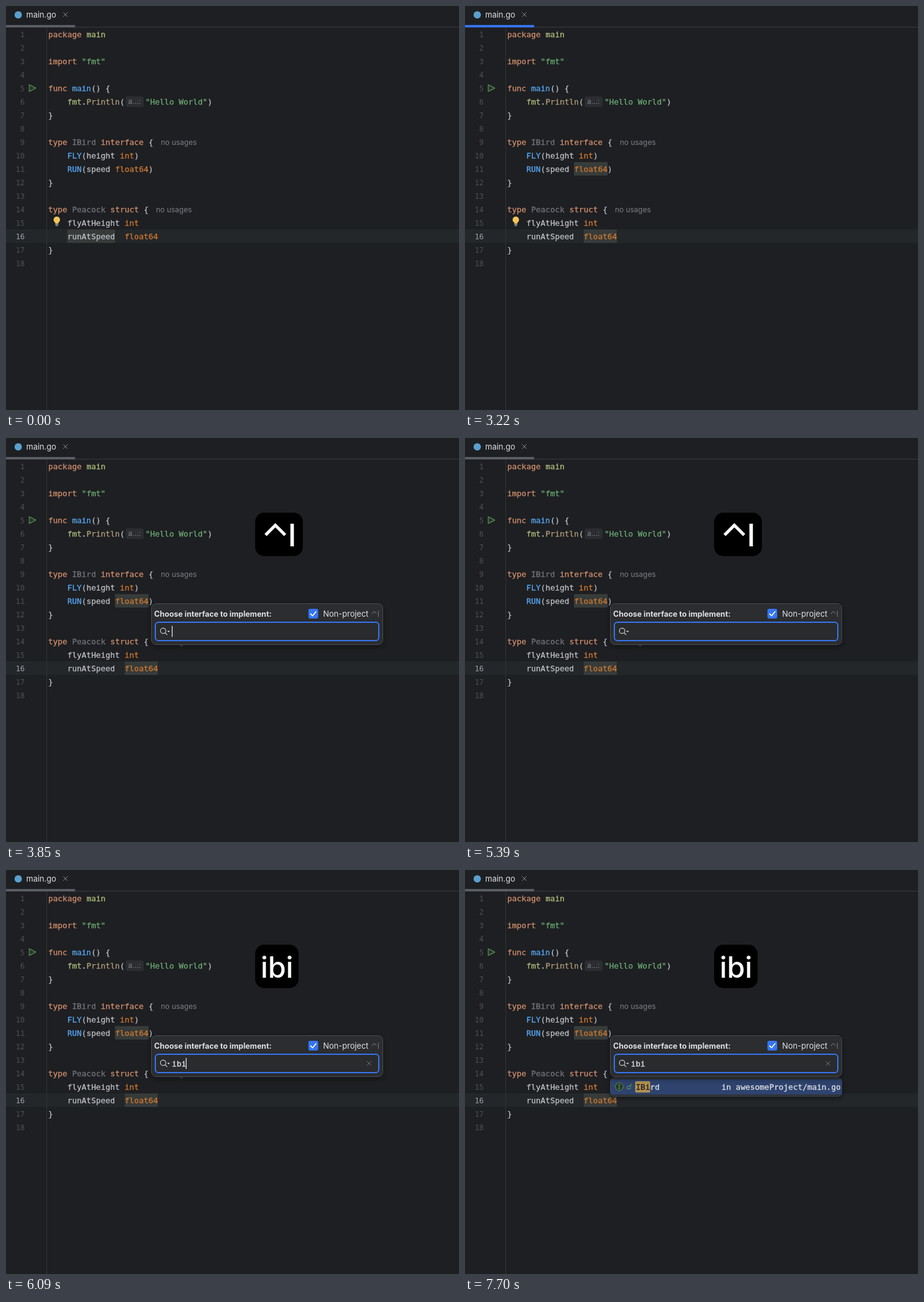
Write an HTML page that moves like this. It is 740x660 px and loops after 8 s.

```html
<!DOCTYPE html>
<html lang="en">
<head>
<meta charset="utf-8">
<title>Implement interface</title>
<style>
  html, body { margin: 0; width: 100%; height: 100%; overflow: hidden; background: #1e1f22; }
  svg { display: block; width: 740px; height: 660px; }
  .mono {
    font: 12.95px "DejaVu Sans Mono", "Noto Sans Mono", monospace;
    color: #bcbec4; fill: currentColor; stroke: currentColor; stroke-width: .3px;
  }
  .num { font-size: 12px; color: #4b5059; stroke-width: 0; text-anchor: end; }
  .ui { font: 13px Inter, "Liberation Sans", sans-serif; fill: #dfe1e5; }
  .title { font-size: 12.5px; font-weight: 700; }
  .hint { font-size: 12px; fill: #7a7e85; }
  .key { color: #cf8e6d; }
  .type { color: #cc7832; }
  .str { color: #6aab73; }
  .func { color: #56a8f5; }
  .call { color: #b09d79; }
  .pkg { color: #afbf7e; }
  .dim { color: #6f737a; }
  .now { color: #a1a3ab; }
  .light { color: #dfe1e5; }
  .dark { color: #1e1f22; }
  .line { fill: none; stroke-linecap: round; stroke-linejoin: round; }
  .edge { fill: #2b2d30; stroke: #111214; stroke-width: 2px; filter: url(#shadow); }
  .rim { fill: #2b2d30; stroke: #4b4d51; }
  .big { font: 500 47.5px Inter, "Liberation Sans", sans-serif; fill: #fff; }
</style>
</head>
<body>
<svg viewBox="0 0 740 660" xmlns="http://www.w3.org/2000/svg">
  <defs>
    <filter id="shadow" x="-10%" y="-30%" width="120%" height="180%">
      <feDropShadow dx="0" dy="3" stdDeviation="5" flood-color="#000" flood-opacity=".4"/>
    </filter>
  </defs>
  <rect width="740" height="660" fill="#1e1f22"/>
  <rect y="365" width="740" height="22" fill="#24272a"/>
  <rect y="34" width="740" height="1" fill="#393b40"/>
  <rect x="66" y="35" width="1" height="625" fill="#313438"/>

  <rect id="tab" y="31" width="113" height="4" rx="1"/>
  <circle cx="20" cy="14.5" r="6" fill="#5a9fd0"/>
  <text class="ui" x="33" y="19">main.go</text>
  <path class="line" d="M93.7 10.7l6.6 6.6m0-6.6l-6.6 6.6" stroke="#868a91"/>

  <path d="M38 128.5v11.2l10.6-5.6z" fill="#253627" stroke="#57965c" stroke-width="1.2" stroke-linejoin="round"/>
  <g fill="#373b39">
    <rect id="fieldMark" x="100" y="365" width="78" height="22"/>
    <g id="typeMark">
      <rect x="178" y="255" width="55" height="22"/>
      <rect x="194" y="365" width="54" height="22"/>
    </g>
  </g>
  <rect x="195.5" y="147.5" width="29.5" height="17.5" rx="4" fill="#2b2d30"/>
  <text class="ui hint" x="199.5" y="160">a...:</text>
  <g id="code"></g>
  <text class="ui hint" x="253" y="227">no usages</text>
  <text class="ui hint" x="245" y="337">no usages</text>

  <g id="bulb">
    <path d="M83 344a5.2 5.2 0 0 1 2.6 9.7v1.8h-5.2v-1.8a5.2 5.2 0 0 1 2.6-9.7z" fill="#f2c55c"/>
    <path d="M80.4 356.7h5.2m-4.6 2h4" stroke="#ced0d6"/>
  </g>
  <rect id="caret" x="247" y="367" width="2" height="18" fill="#ced0d6"/>

  <g id="list">
    <rect class="edge" x="237.5" y="339.5" width="378" height="30" rx="6"/>
    <rect class="rim" x="237.5" y="339.5" width="378" height="30" rx="6"/>
    <rect x="238" y="342" width="377.5" height="25" fill="#2e436e"/>
    <circle cx="252" cy="354" r="6.4" fill="#253627" stroke="#57965c"/>
    <path d="M250 351h4m-2 0v6m-2 0h4" stroke="#57965c"/>
    <path class="line" d="M265.5 353.5h5v4h-5zm3.5 0v-1.5a1.8 1.8 0 0 1 3.6 0v.8" stroke="#57965c"/>
    <rect x="278" y="345" width="24.5" height="18.5" rx="2" fill="#b2924f"/>
    <text class="mono dark" x="279" y="358.5">IBi</text>
    <text class="mono light" x="302.4" y="358.5">rd</text>
    <text class="mono light" x="419" y="358.5">in awesomeProject/main.go</text>
  </g>

  <g id="popup">
    <rect class="edge" x="237.5" y="270.5" width="378" height="67" rx="7"/>
    <rect class="rim" x="237.5" y="270.5" width="378" height="67" rx="7"/>
    <text class="ui title" x="242" y="291.5">Choose interface to implement:</text>
    <rect x="494" y="279" width="16" height="16" rx="3" fill="#3574f0"/>
    <path class="line" d="M497.8 287.3l3 3.2 5.6-6.8" stroke="#fff" stroke-width="1.8"/>
    <text class="ui" x="518" y="291.5">Non-project</text>
    <path class="line" d="M598 287l3.5-4 3.5 4m3.3-4.5v9.5" stroke="#7a7e85"/>
    <rect x="244" y="301" width="365" height="30" rx="5" fill="#2a2b2d" stroke="#3574f0" stroke-width="2"/>
    <circle class="line" cx="256.7" cy="315" r="4.4" stroke="#ced0d6" stroke-width="1.2"/>
    <path class="line" d="M260 318.3l3 3" stroke="#ced0d6" stroke-width="1.2"/>
    <path d="M263.3 315h4.6l-2.3 2.6z" fill="#ced0d6"/>
    <text id="query" class="mono light" x="271" y="320.5"></text>
    <path id="clear" class="line" d="M589.8 312.8l6.4 6.4m0-6.4l-6.4 6.4" stroke="#6f737a"/>
    <rect id="inputCaret" y="307" width="1.3" height="18" fill="#dfe1e5"/>
  </g>

  <g id="badge">
    <rect id="badgeBox" x="407" y="122" height="71" rx="15"/>
    <text id="typed" class="big" x="416" y="175.5"></text>
    <g id="shortcut">
      <path d="M424 158.5l16-16 16 16" fill="none" stroke="#fff" stroke-width="5"/>
      <text class="big" x="460.5" y="176.5" style="font-size:51px">I</text>
    </g>
  </g>
</svg>
<script>
const LOOP = 8000, CHAR = 7.8, LEFT = 69, FIRST = 50.5, ROW = 22;
const el = {};
for (const node of document.querySelectorAll("[id]")) el[node.id] = node;

// row, then column / text / class triples
const code = [
  [1, 0, "package", "key", 8, "main", "pkg"],
  [3, 0, "import", "key", 7, '"fmt"', "str"],
  [5, 0, "func", "key", 5, "main", "func", 9, "()", "", 12, "{", ""],
  [6, 4, "fmt", "pkg", 7, ".", "", 8, "Println", "call", 15, "(", "",
    20.35, '"Hello World"', "str", 33.35, ")", ""],
  [7, 0, "}", ""],
  [9, 0, "type", "key", 5, "IBird", "dim", 11, "interface", "key", 21, "{", ""],
  [10, 4, "FLY", "func", 7, "(height", "", 15, "int", "type", 18, ")", ""],
  [11, 4, "RUN", "func", 7, "(speed", "", 14, "float64", "type", 21, ")", ""],
  [12, 0, "}", ""],
  [14, 0, "type", "key", 5, "Peacock", "dim", 13, "struct", "key", 20, "{", ""],
  [15, 4, "flyAtHeight", "", 16, "int", "type"],
  [16, 4, "runAtSpeed", "", 16, "float64", "type"],
  [17, 0, "}", ""]
];

function addText(x, row, text, cls) {
  const node = document.createElementNS("http://www.w3.org/2000/svg", "text");
  node.setAttribute("x", x);
  node.setAttribute("y", FIRST + (row - 1) * ROW);
  node.setAttribute("class", "mono " + cls);
  node.textContent = text;
  el.code.append(node);
}

for (let n = 1; n <= 18; n++) addText(30.5, n, n, n === 16 ? "num now" : "num");
for (const [row, ...parts] of code) {
  for (let i = 0; i < parts.length; i += 3) {
    addText(LEFT + parts[i] * CHAR, row, parts[i + 1], parts[i + 2]);
  }
}

const show = (name, on) => { el[name].style.display = on ? "" : "none"; };
const within = (t, ...spans) => spans.some(([from, to]) => t >= from && t < to);
// latest value whose start time has passed
const latest = (t, steps) => steps.filter(([at]) => t >= at).pop()[1];

function update(t) {
  const query = latest(t, [[0, ""], [5950, "i"], [6020, "ib"], [6090, "ibi"]]);
  const keys = latest(t, [[0, ""], [5880, "i"], [6020, "ib"], [6090, "ibi"]]);

  el.tab.setAttribute("fill", within(t, [1120, 3850]) ? "#3574f0" : "#5a5d63");
  show("fieldMark", t < 1120);
  show("typeMark", t >= 1120);
  show("bulb", within(t, [0, 1120], [2170, 3850]));
  show("caret", within(t, [1120, 2170], [2730, 3220], [3780, 3850]));

  show("popup", t >= 3850);
  show("list", t >= 6160);
  show("clear", query);
  el.query.textContent = query;
  el.inputCaret.setAttribute("x", 270.8 + query.length * CHAR - (query ? 0.5 : 0));
  show("inputCaret", within(t, [3850, 4340], [4900, 5390], [5880, 6650], [7140, 7700]));

  show("badge", t >= 3780);
  show("shortcut", !keys);
  el.typed.textContent = keys;
  el.badgeBox.setAttribute("width", [78, 33, 61, 71][keys.length]);
}

const start = performance.now();
function frame() {
  update((performance.now() - start) % LOOP);
  requestAnimationFrame(frame);
}
frame();
</script>
</body>
</html>
```
